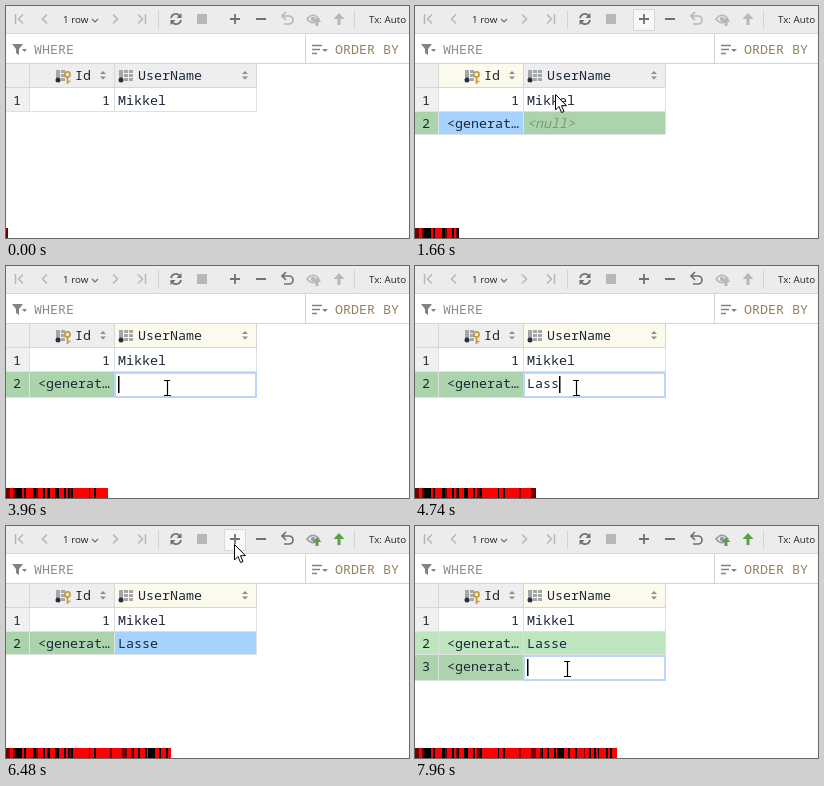
An HTML page with a canvas for the animation above (8 s loop, 403 by 232 pixels).

```html
<!DOCTYPE html>
<html lang="en">
<head>
<meta charset="utf-8">
<title>Adding rows to a table</title>
<style>
  html, body { margin: 0; width: 100%; height: 100%; overflow: hidden; background: #fff; }
  canvas { display: block; }
</style>
</head>
<body>
<canvas id="stage" width="403" height="232"></canvas>
<script>
const ctx = document.getElementById('stage').getContext('2d');
const LOOP = 8000, STEP = 69.9;
const MONO = '500 13.33px "Noto Sans Mono", "DejaVu Sans Mono", monospace';
const SANS = '9.8px "Open Sans", "Noto Sans", sans-serif';
const INK = '#1c2738', ICON = '#6e7073', OFF = '#b5b7b9', GREEN = '#57a245', GRID = '#dfe1e0';
const BLUE = '#a6d2ff', ADDED = '#bee6be', CURRENT = '#acd4ac', ACTIVE = '#fcfaed', PANEL = '#eeeeef';
const ROW_TOP = [82, 106, 129], EDITOR_HEIGHT = 26;

// Moments at which the interface changes
const AT = {
  addFirst: 1040, leaveAdd: 1740, enable: 1900, select: 1960, edit: 2300, disable: 2800,
  type: 4280, commit: 5150, enableAgain: 6000,
  hoverAgain: 6420, addSecond: 6860, leaveAgain: 7240, editAgain: 7640
};

// Pointer path: time, x, y
const PATH = [
  [70, 345, 112], [560, 239, 30], [780, 228, 17], [1250, 228, 17], [1660, 140, 88],
  [1900, 148, 115], [2550, 148, 115], [3100, 157, 119], [3600, 161, 122], [5150, 161, 122],
  [5440, 159, 121], [5950, 159, 121], [6480, 228, 18], [6800, 229, 21], [7060, 230, 22],
  [7480, 152, 143], [8000, 152, 143]
];

const between = (t, a, b) => t >= a && t < b;

function rect(x, y, w, h, color) {
  ctx.fillStyle = color;
  ctx.fillRect(x, y, w, h);
}

function text(str, x, y, color = INK, font = MONO, align = 'left') {
  ctx.font = font;
  ctx.textAlign = align;
  ctx.fillStyle = color;
  ctx.fillText(str, x, y);
}

function stroke(d, color, width = 1.5) {
  ctx.strokeStyle = color;
  ctx.lineWidth = width;
  ctx.stroke(new Path2D(d));
}

function fill(d, color) {
  ctx.fillStyle = color;
  ctx.fill(new Path2D(d));
}

function dot(x, y, r, color) {
  ctx.beginPath();
  ctx.arc(x, y, r, 0, Math.PI * 2);
  ctx.fillStyle = color;
  ctx.fill();
}

function drawToolbar(t) {
  rect(0, 0, 403, 28, '#ececec');
  rect(0, 27, 403, 1, '#d6d6d6');
  for (const x of [152, 348]) rect(x, 4, 1, 19, '#d3d3d3');

  stroke('M9.5 8V18M17 8.5L12.5 13L17 17.5M41 8.5L36.5 13L41 17.5', OFF);
  stroke('M107 8.5L111.5 13L107 17.5M132 8.5L136.5 13L132 17.5M139.5 8V18', OFF);
  text('1 row', 57, 17, '#222', SANS);
  stroke('M86 13L89 16L92 13', ICON, 1.2);

  stroke('M165 12A5 5 0 0 1 174 10M175 14A5 5 0 0 1 166 16', ICON, 1.7);
  fill('M175.5 7V12H170.5ZM164.5 19V14H169.5Z', ICON);
  rect(191, 8, 10, 10, OFF);

  if (between(t, 700, AT.leaveAdd) || between(t, AT.hoverAgain, AT.leaveAgain)) {
    fill('M218 3H240V25H218Z', '#f8f8f8');
    stroke('M218.5 3.5H239.5V24.5H218.5Z', '#d8d8d8', 1);
  }
  stroke('M229 8V18M224 13H234M250 13H260', ICON, 1.8);

  const canSubmit = between(t, AT.enable, AT.disable) || t >= AT.enableAgain;
  const submit = canSubmit ? GREEN : OFF;
  stroke('M280 6L276 10L280 14M276 10H283A4 4 0 0 1 283 18H278', t >= AT.enable ? ICON : OFF, 1.7);
  const eye = canSubmit ? '#979b9e' : OFF;
  stroke('M301 13Q307 5.5 313 13Q307 20.5 301 13Z', eye, 1.5);
  dot(307, 13, 2.2, eye);
  fill('M311 11.5L315.5 16H312.5V20H309.5V16H306.5Z', submit);
  fill('M333 7L338.5 13H334.5V19H331.5V13H327.5Z', submit);
  text('Tx: Auto', 363, 17, '#222', SANS);
}

function drawFilters() {
  fill('M6 38H17L13 43V49L10 47V43Z', '#7f8386');
  fill('M16 43H21L18.5 46Z', '#7f8386');
  text('WHERE', 28, 48, '#8a8c8c');
  rect(299, 28, 1, 29, '#d4d4d4');
  stroke('M306 39.5H316M306 43.5H314M306 47.5H311', '#7f8386', 1.6);
  fill('M316 43H322L319 46Z', '#7f8386');
  text('ORDER BY', 329, 48, '#95815f');
  rect(0, 57, 403, 1, '#d4d4d4');
}

function drawColumnIcon(x, isKey) {
  const gray = '#a3a7aa';
  rect(x, 64, 4, 11, gray);
  for (let row = 0; row < 3; row++) {
    rect(x + 5, 64 + row * 4, 4, 3, gray);
    if (!isKey) rect(x + 10, 64 + row * 4, 4, 3, gray);
  }
  if (isKey) {
    stroke(`M${x + 11.5} 71V78M${x + 11.5} 75.5H${x + 14.5}`, '#c79a3c', 1.7);
    ctx.beginPath();
    ctx.arc(x + 11.5, 68.5, 2.6, 0, Math.PI * 2);
    ctx.stroke();
  }
  dot(x + 2, 74, 2.5, '#243044');
}

function drawHeader(t) {
  const idActive = between(t, AT.addFirst, AT.select);
  rect(0, 58, 250, 23, PANEL);
  if (idActive) rect(24, 58, 84, 23, ACTIVE);
  if (t >= AT.select) rect(109, 58, 141, 23, ACTIVE);
  drawColumnIcon(50, true);
  drawColumnIcon(113, false);
  text('Id', 69, 74);
  text('UserName', 132, 74);
  for (const x of [97, 239])
    fill(`M${x - 3} 68H${x + 3}L${x} 65ZM${x - 3} 70.5H${x + 3}L${x} 73.5Z`, '#8b8e91');
  rect(0, 81, 251, 1, '#d6d6d6');
}

function drawRow(index, id, name, look, height = 23) {
  const top = ROW_TOP[index], base = top + (index ? 16 : 17);
  rect(0, top, 24, height, look.gutter);
  rect(24, top, 84, height, look.id);
  rect(109, top, 141, height, look.name);
  rect(0, top + height - 1, 251, 1, GRID);
  for (const x of [23, 108, 250]) rect(x, top, 1, height, GRID);
  text(index + 1, 11, base, INK, MONO, 'center');
  text(id, 104, base, INK, MONO, 'right');
  if (name === '<null>' && look.name !== BLUE) text(name, 112, base, '#829482', 'italic ' + MONO);
  else text(name, 112, base);
}

function drawEditor(index, value, caretOn) {
  const top = ROW_TOP[index];
  rect(108, top, 143, EDITOR_HEIGHT, '#fff');
  ctx.strokeStyle = '#bcd6fb';
  ctx.lineWidth = 2;
  ctx.strokeRect(109, top + 1, 141, EDITOR_HEIGHT - 2);
  text(value, 112, top + 16);
  if (caretOn) rect(112 + value.length * 8, top + 4, 1.5, 17, '#000');
}

function drawTable(t) {
  drawHeader(t);
  for (const x of [23, 108, 250]) rect(x, 58, 1, 23, '#d6d6d6');
  drawRow(0, '1', 'Mikkel', { gutter: '#f0f0f0', id: '#fff', name: '#fff' }, 24);

  const typed = 'Lasse'.slice(0, Math.max(0, Math.floor((t - AT.type) / 140) + 1));
  const caretOn = t < 3000 || between(t, AT.type, AT.commit) || (t - 2510) % 1000 < 500;
  const editing = between(t, AT.edit, AT.commit), editingSecond = t >= AT.editAgain;
  const second = t >= AT.addSecond;

  if (t >= AT.addFirst) {
    const tint = second ? ADDED : CURRENT;
    const onName = t >= AT.select && !second;
    drawRow(1, '<generat…', t < AT.commit ? '<null>' : typed,
      { gutter: tint, id: t < AT.select ? BLUE : tint, name: onName ? BLUE : tint },
      editing ? EDITOR_HEIGHT : 23);
  }
  if (second) {
    drawRow(2, '<generat…', '<null>', { gutter: CURRENT, id: CURRENT, name: BLUE },
      editingSecond ? EDITOR_HEIGHT : 23);
  }
  if (editing) drawEditor(1, typed, caretOn);
  if (editingSecond) drawEditor(2, '', true);
}

function pointerAt(t) {
  const i = PATH.findIndex(p => p[0] > t);
  const [t0, x0, y0] = PATH[i - 1], [t1, x1, y1] = PATH[i];
  const u = (t - t0) / (t1 - t0), e = u * u * (3 - 2 * u);
  return [x0 + (x1 - x0) * e, y0 + (y1 - y0) * e];
}

function drawPointer(t) {
  if (t < 70) return;
  const [x, y] = pointerAt(t).map(Math.round);
  ctx.save();
  ctx.translate(x, y);
  if (between(t, AT.edit, AT.commit) || t >= AT.editAgain) {
    stroke('M-3 -7.5H3M.5 -7V7M-3 7.5H4', '#000', 1.2);
  } else {
    const arrow = 'M.5 .5V16L4 12.5L6.5 18.5L9 17.5L6.5 11.7H11.5Z';
    fill(arrow, '#fff');
    stroke(arrow, '#000', 1);
  }
  ctx.restore();
}

function noise(n) {
  const v = Math.sin(n * 127.1 + 3.7) * 43758.5453;
  return v - Math.floor(v);
}

// One stripe per step; busy stretches are darker
function drawProgress(step) {
  const pitch = 200 / 114;
  for (let k = 0; k <= step; k++) {
    const busy = k < 24 ? .55 : k < 37 ? .5 : k < 58 ? .1 : k < 79 ? .28 : k < 88 ? .5 : k < 94 ? .2 : .45;
    const n = noise(k);
    const red = k === 0 ? 110 : n < busy * .65 ? 0 : n < busy ? 110 : 255;
    const x = k ? Math.round(2 + (k - 1) * pitch) : 0;
    rect(x, 222, Math.round(2 + k * pitch) - x, 10, `rgb(${red},0,0)`);
  }
}

function draw(now) {
  const step = Math.min(114, Math.floor((now % LOOP + 25) / STEP));
  const t = step * STEP;
  rect(0, 0, 403, 232, '#fff');
  drawToolbar(t);
  drawFilters();
  drawTable(t);
  drawProgress(step);
  drawPointer(t);
}

const start = performance.now();
function tick() {
  draw(performance.now() - start);
  requestAnimationFrame(tick);
}
tick();
</script>
</body>
</html>
```
